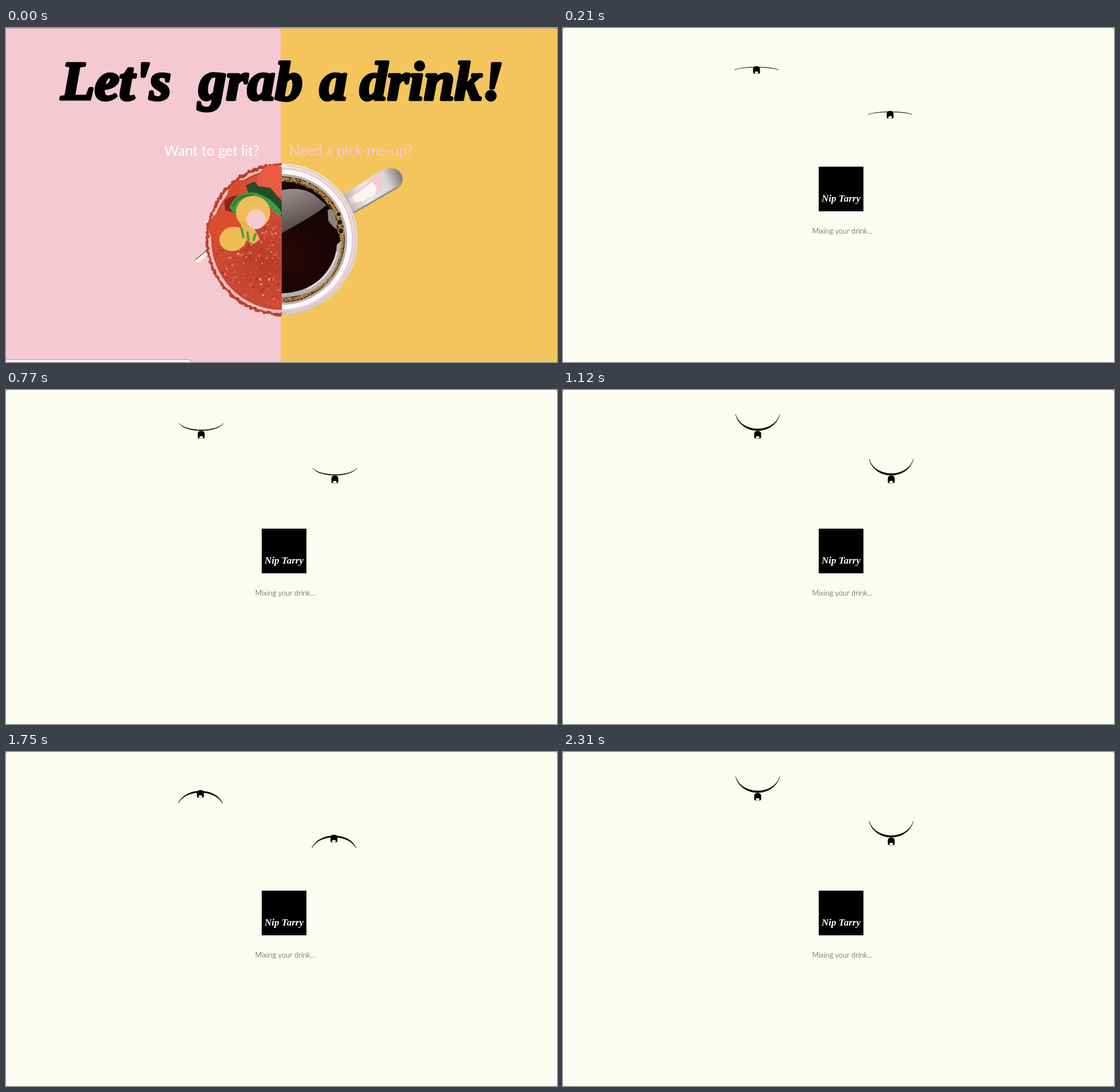
These frames come from a looping animation (961x583 px, 2.38 s). An HTML page with a canvas:

```html
<!DOCTYPE html>
<html lang="en">
<head>
<meta charset="utf-8">
<title>Drinks</title>
<style>
html, body { margin: 0; width: 100%; height: 100%; overflow: hidden; background: #fcfcf0; }
canvas { display: block; }
</style>
</head>
<body>
<canvas id="stage" width="961" height="583"></canvas>
<script>
const ctx = document.getElementById('stage').getContext('2d');
const TAU = Math.PI * 2;
const LOOP = 2380, STEP = 70, SWITCH = 210;
const CX = 481, CY = 369;
const CREAM = '#fcfcf0', PINK = '#f5c9d2', YELLOW = '#f4c55c';

// time, lid depth (positive hangs down), centre x
const LID = [
  [210, -5, 337.5], [490, -20, 338.5], [770, 13, 340.5], [945, 36, 340],
  [1120, 28, 339.5], [1295, 6, 339], [1470, 25, 339.5], [1750, -21, 339],
  [2170, 38, 339.5], [2240, 34, 339.5], [2310, 28, 339.5]
];

function seeded(seed) {
  return () => (seed = (seed * 16807) % 2147483647) / 2147483647;
}

function ellipse(x, y, rx, ry, fill, turn = 0) {
  ctx.beginPath();
  ctx.ellipse(x, y, rx, ry, turn, 0, TAU);
  ctx.fillStyle = fill;
  ctx.fill();
}

const disc = (x, y, r, fill) => ellipse(x, y, r, r, fill);

function shape(path, fill) {
  ctx.fillStyle = fill;
  ctx.fill(new Path2D(path));
}

function line(path, color, width) {
  ctx.strokeStyle = color;
  ctx.lineWidth = width;
  ctx.lineCap = 'round';
  ctx.stroke(new Path2D(path));
}

function arc(r, from, to, color, width) {
  ctx.beginPath();
  ctx.arc(CX, CY, r, from, to);
  ctx.strokeStyle = color;
  ctx.lineWidth = width;
  ctx.stroke();
}

function label(str, x, y, font, fill, align = 'left') {
  ctx.font = font;
  ctx.textAlign = align;
  ctx.fillStyle = fill;
  ctx.fillText(str, x, y);
}

function clipped(x, w, draw) {
  ctx.save();
  ctx.beginPath();
  ctx.rect(x, 0, w, 583);
  ctx.clip();
  draw();
  ctx.restore();
}

function cocktail() {
  const rnd = seeded(41);
  line('M334 406L364 381', '#fff6ee', 7);
  line('M331 404L361 379', '#8a5b22', 1.5);
  disc(CX, CY, 130, '#f3bdbb');
  arc(130, 0, TAU, '#b5402f', 2);
  disc(CX, CY, 123, '#c94531');
  for (let i = 0; i < 120; i++) {
    const a = Math.PI / 2 + Math.PI * i / 119;
    const r = 129 + rnd() * 3;
    disc(CX + r * Math.cos(a), CY + r * Math.sin(a), 1.5 + rnd() * 1.8, '#b9402f');
  }
  const glow = ctx.createRadialGradient(450, 410, 10, 450, 400, 115);
  glow.addColorStop(0, '#b83e2b');
  glow.addColorStop(1, '#d9503a');
  disc(CX, CY, 120, glow);
  for (let i = 0; i < 420; i++) {
    const a = Math.PI / 2 + Math.PI * rnd(), r = 120 * Math.sqrt(rnd());
    const tone = ['#e8715a', '#a93424', '#e0563e', '#f0a08c'][Math.floor(rnd() * 3.25)];
    disc(CX + r * Math.cos(a), CY + r * Math.sin(a), 0.6 + rnd() * 1.6, tone);
  }
  ellipse(466, 268, 28, 29, '#e85b40');
  ellipse(408, 285, 23, 18, '#d94b31', -0.6);
  shape('M381 302Q397 287 412 296L400 324L383 324Z', '#8c241a');
  shape('M418 275L433 268L440 276L461 279L481 302L481 329Q455 306 424 291Z', '#214e28');
  ellipse(384, 351, 30, 32, '#dc4d30', -0.4);
  shape('M390 313Q400 286 431 287Q462 293 481 322L478 329Q451 301 425 301Q406 303 399 326Z', '#3e9b45');
  line('M395 311Q406 291 429 292', '#278338', 4);
  ellipse(431, 322, 30, 29, '#eebd57');
  shape('M407 333L431 346L443 369L432 377L416 369Z', '#e9b74f');
  ellipse(436, 334, 17, 17, PINK);
  ellipse(396, 368, 24, 21, '#eebd52', -0.35);
  line('M411 351L414 365M421 357L423 370M435 360L432 370', '#4f9845', 4);
}

function handle() {
  const g = ctx.createLinearGradient(595, 300, 693, 258);
  g.addColorStop(0, '#bdb9b8');
  g.addColorStop(0.3, '#eeeaea');
  g.addColorStop(0.72, '#d8d4d3');
  g.addColorStop(1, '#777270');
  shape('M588 291L656 248Q682 238 691 258Q695 273 681 281L604 325Z', g);
  line('M607 322L683 278', '#918b88', 3);
  shape('M598 298L646 256Q660 262 654 284L626 303L602 307Z', PINK);
  shape('M604 295L638 269Q651 277 643 291L622 303L607 303Z', '#f8f5f3');
}

function coffee() {
  const rnd = seeded(17);
  handle();
  const cup = ctx.createLinearGradient(0, 237, 0, 501);
  cup.addColorStop(0, '#f6f2f2');
  cup.addColorStop(0.65, '#e7e2e2');
  cup.addColorStop(1, '#c9c2c1');
  disc(CX, CY, 132, cup);
  arc(129, -1.5, 1.5, '#d5cecd', 3);
  arc(124, -1.57, 1.57, '#f4c8d1', 4);
  arc(118, -1.57, 1.57, '#fbf8f7', 8);
  arc(112, -1.57, 1.57, '#b9aeaa', 4);
  disc(CX, CY, 110, '#4a2a1c');
  arc(106, -1.57, 1.57, '#a77d3d', 5);
  for (let i = 0; i < 115; i++) {
    const a = -Math.PI / 2 + Math.PI * rnd(), r = 100 + rnd() * 9;
    const x = CX + r * Math.cos(a), y = CY + r * Math.sin(a);
    disc(x, y, 1 + rnd() * 2, '#c19b58');
    disc(x, y, 0.7 + rnd(), '#291109');
  }
  disc(CX, CY, 101, '#180607');
  const tint = ctx.createRadialGradient(500, 400, 5, 500, 400, 90);
  tint.addColorStop(0, '#270608');
  tint.addColorStop(1, '#140405');
  disc(CX, CY, 96, tint);
  const shine = ctx.createLinearGradient(490, 280, 515, 345);
  shine.addColorStop(0, '#9b9090');
  shine.addColorStop(1, '#594b4d');
  shape('M481 283Q514 276 536 290L559 309Q545 323 481 358Z', shine);
  shape('M561 318Q568 312 574 324L578 352Q569 347 562 336Z', '#91827f');
  shape('M585 371Q583 441 521 464Q500 470 481 470V463Q521 462 548 438Q576 410 577 378Z', '#b9afae');
  line('M577 392Q567 435 526 455', '#e0d8d7', 3);
  for (const [x, y, r] of [[580, 325, 5], [582, 339, 6], [584, 354, 6]]) {
    disc(x, y, r, '#c7a56d');
    disc(x, y, r - 1.5, '#32180f');
  }
}

function headline() {
  ctx.lineJoin = 'round';
  ctx.lineWidth = 5;
  ctx.strokeStyle = '#000';
  for (const [word, x] of [["Let's", 96], ['grab', 336], ['a', 547], ['drink!', 617]]) {
    label(word, x, 125, 'italic bold 96px "Liberation Serif", serif', '#000');
    ctx.strokeText(word, x, 125);
  }
}

function menu() {
  ctx.fillStyle = PINK;
  ctx.fillRect(0, 0, 479, 583);
  ctx.fillStyle = YELLOW;
  ctx.fillRect(479, 0, 482, 583);
  headline();
  const font = '24.6px Lato, sans-serif';
  label('Want to get lit?', 276, 223, font, '#fff');
  label('Need a pick-me-up?', 494, 223, font, PINK);
  clipped(0, CX, cocktail);
  clipped(CX, 480, coffee);
  ctx.fillStyle = '#a99b96';
  ctx.fillRect(0, 0, 961, 1);
  ctx.beginPath();
  ctx.roundRect(-5, 579, 328, 10, 4);
  ctx.fillStyle = '#fff';
  ctx.fill();
  ctx.strokeStyle = '#a08e90';
  ctx.lineWidth = 1;
  ctx.stroke();
}

function lidAt(t) {
  let i = 0;
  while (i < LID.length - 2 && t >= LID[i + 1][0]) i++;
  const [t0, d0, x0] = LID[i], [t1, d1, x1] = LID[i + 1];
  const k = Math.min(1, (t - t0) / (t1 - t0));
  const e = (1 - Math.cos(Math.PI * k)) / 2;
  return { depth: d0 + (d1 - d0) * e, x: x0 + (x1 - x0) * e };
}

// The lid is part of an ellipse, cut off at an angle before its widest point.
function eye(dx, dy, { depth, x }) {
  const side = Math.tanh(depth / 3);
  const mid = 69.5 + 1.5 * side;
  const cut = depth < 0 ? 0.32 : 0.2;
  const rx = 38.5 / Math.cos(cut);
  const ry = Math.abs(depth) / (1 - Math.sin(cut));
  const from = (depth < 0 ? Math.PI : 0) + cut, to = from + Math.PI - 2 * cut;
  const base = mid - Math.sign(depth) * ry;
  ctx.save();
  ctx.translate(dx + x, dy);
  ctx.beginPath();
  ctx.ellipse(0, base, rx, ry, 0, from, to);
  ctx.ellipse(0, base, rx, ry * 0.91, 0, to, from, true);
  ctx.fillStyle = ctx.strokeStyle = '#000';
  ctx.fill();
  ctx.lineWidth = 0.4;
  ctx.stroke();
  const top = mid - 0.5 + 0.9 * side;
  ctx.beginPath();
  ctx.roundRect(-6, top, 12, 13, [5, 5, 2, 2]);
  ctx.fill();
  ellipse(0, top + 11, 3.2, 2, CREAM);
  ctx.restore();
}

function loader(t) {
  ctx.fillStyle = CREAM;
  ctx.fillRect(0, 0, 961, 583);
  const lid = lidAt(t);
  eye(0, 0, lid);
  eye(233, 78, lid);
  ctx.fillStyle = '#000';
  ctx.fillRect(446, 242, 78, 78);
  label('Nip Tarry', 485, 303, 'italic bold 17px "Liberation Serif", serif', CREAM, 'center');
  label('Mixing your drink...', 487, 359, '300 12.8px Lato, sans-serif', '#333', 'center');
}

function frame(now) {
  const t = Math.floor((now % LOOP) / STEP) * STEP;
  if (t < SWITCH) menu();
  else loader(t);
  ctx.fillStyle = '#000';
  ctx.fillRect(0, 0, 1, 1);
  ctx.fillRect(960, 0, 1, 1);
  requestAnimationFrame(frame);
}

frame(performance.now());
</script>
</body>
</html>
```
